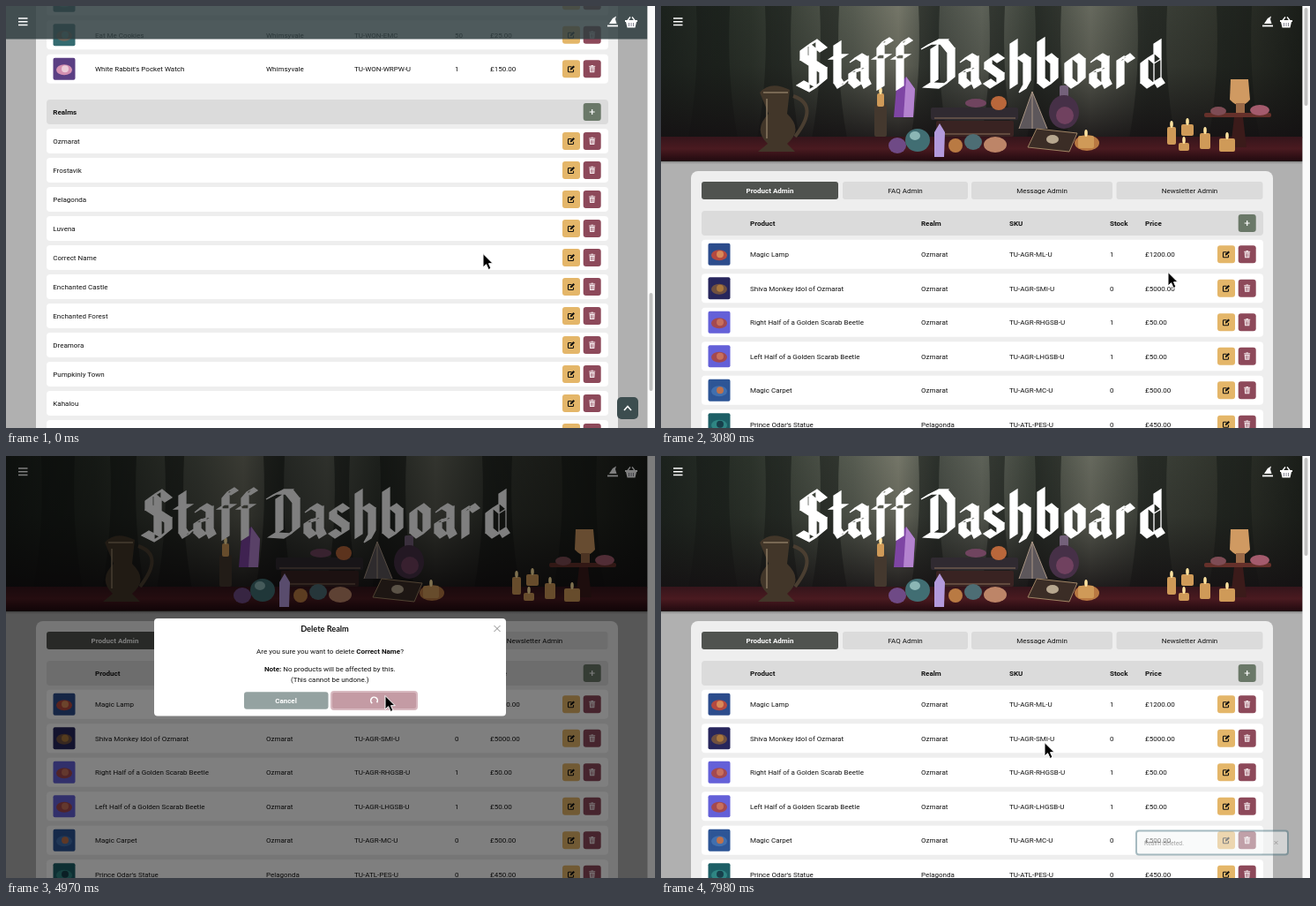
Recreate the animation shown at these times as an HTML page. Size 736 by 478 pixels, loop 8 s.

```html
<!DOCTYPE html>
<html lang="en">
<head>
<meta charset="utf-8">
<title>Staff Dashboard</title>
<style>
html, body { margin: 0; width: 736px; height: 478px; overflow: hidden; background: #b0b0b0; }
svg { display: block; }
text { font: 8px Roboto, sans-serif; fill: #111; white-space: pre; }
.b { font-weight: 700; }
.m { text-anchor: middle; }
.w { fill: #fff; }
.url { font: 12px "Open Sans", sans-serif; fill: #4b505a; }
.title { font: 700 9.2px Lato, sans-serif; }
.toast { font-size: 6.8px; fill: #444; }
</style>
</head>
<body>
<svg id="stage" width="736" height="478" viewBox="0 0 736 478"></svg>
<script>
const LOOP = 8000;
const CLICK = 1150, LOAD = 2950, OPEN = 3160, CONFIRM = 4803, DONE = 7600, TOAST = 7850;

// Markup helpers
const rect = (x, y, w, h, fill, r = 0, more = '') =>
  `<rect x="${x}" y="${y}" width="${w}" height="${h}" rx="${r}" fill="${fill}" ${more}/>`;
const path = (d, fill, more = '') => `<path d="${d}" fill="${fill}" ${more}/>`;
const line = (d, color, w = 1) => path(d, 'none', `stroke="${color}" stroke-width="${w}"`);
const oval = (x, y, rx, ry, fill) => `<ellipse cx="${x}" cy="${y}" rx="${rx}" ry="${ry}" fill="${fill}"/>`;
const text = (x, y, s, cls = '') => `<text x="${x}" y="${y + 2.8}" class="${cls}">${s}</text>`;
const at = (x, y, s) => `<g transform="translate(${x} ${y})">${s}</g>`;
const group = (id, s) => `<g id="${id}">${s}</g>`;
const gradient = (id, dir, stops) => `<linearGradient id="${id}" ${dir}>` + stops.map(([o, c, a = 1]) =>
  `<stop offset="${o}" stop-color="${c}" stop-opacity="${a}"/>`).join('') + '</linearGradient>';
const DOWN = 'x2="0" y2="1"';

// Buttons
const editBtn = y => at(641, y, rect(-10, -10, 20, 20, '#e4b669', 3) +
  line('M.5-2.5H-2.7Q-3.5-2.5-3.5-1.7V2.7Q-3.5 3.5-2.7 3.5H1.7Q2.5 3.5 2.5 2.7V.8', '#111', 1.1) +
  path('M-1.2 1.4L-.7-.7 2.5-3.9 4-2.4 .8 .8Z', '#111'));
const trashBtn = y => at(664.7, y, rect(-10, -10, 20, 20, '#8d495a', 3) +
  line('M-3.5-3H3.5M-1.3-3.8H1.3', '#f5eaed') +
  path('M-3-2H3L2.6 4H-2.6Z', '#f5eaed') + line('M-1.3-1V3M0-1V3M1.3-1V3', '#8d495a', .6));
const addBtn = y => at(664.7, y, rect(-10, -10, 20, 20, '#6a7868', 3) + line('M-3 0H3M0-3V3', '#fff', 1.2));
const spinner = (id, x, y) => at(x, y, group(id, line('M2.7 2.7A3.8 3.8 0 1 1 2.7-2.7', '#fff', 1.6)));

// Tables
const COLS = [101, 295, 395, 509, 549];
const cells = (y, row, cls) => row.map((s, i) => text(COLS[i], y, s, cls)).join('');
const bar = y => rect(46, y - 14, 637, 28, '#dbdbdb', 4);
const product = (y, row, [back, front, spot]) => rect(46, y - 16.5, 637, 33, '#fff', 4) +
  rect(53.5, y - 12.5, 25, 25, back, 2) + oval(66, y + 1, 9, 6, front) + oval(67, y, 4, 4, spot) +
  cells(y, row) + editBtn(y) + trashBtn(y);
const realm = (name, i) => {
  const y = 153 + 33 * i;
  return rect(46, y - 14, 637, 28, '#fff', 4) + text(53.3, y, name) + editBtn(y) + trashBtn(y);
};

const REALMS = ['Ozmarat', 'Frostavik', 'Pelagonda', 'Luvena', 'Correct Name', 'Enchanted Castle',
  'Enchanted Forest', 'Dreamora', 'Pumpkinly Town', 'Kahalou', ''];
const SCARAB = ['#6460d8', '#a4494f', '#c8705c'];
const PRODUCTS = [
  [['Magic Lamp', 'Ozmarat', 'TU-AGR-ML-U', 1, '£1200.00'], ['#2c4c8c', '#b5493f', '#d98a58']],
  [['Shiva Monkey Idol of Ozmarat', 'Ozmarat', 'TU-AGR-SMI-U', 0, '£5000.00'], ['#27265c', '#705040', '#a9763c']],
  [['Right Half of a Golden Scarab Beetle', 'Ozmarat', 'TU-AGR-RHGSB-U', 1, '£50.00'], SCARAB],
  [['Left Half of a Golden Scarab Beetle', 'Ozmarat', 'TU-AGR-LHGSB-U', 1, '£50.00'], SCARAB],
  [['Magic Carpet', 'Ozmarat', 'TU-AGR-MC-U', 0, '£500.00'], ['#2d5596', '#416fae', '#bd714c']],
  [['Prince Odar\'s Statue', 'Pelagonda', 'TU-ATL-PES-U', 0, '£450.00'], ['#1d5f66', '#2f8583', '#173f4b']],
];
const SCROLLED = [
  [['', '', '', '', ''], ['#2d5f68', '#4b8a88', '#33505c']],
  [['Eat Me Cookies', 'Whimsyvale', 'TU-WON-EMC', 50, '£25.00'], ['#356b70', '#75665a', '#5d9691']],
  [['White Rabbit\'s Pocket Watch', 'Whimsyvale', 'TU-WON-WRPW-U', 1, '£150.00'], ['#5b3f83', '#d38fb0', '#eacbd8']],
];

// Blackletter drawn with a slanted broad nib; each polyline follows the nib's lower left corner
const NIB = [8, -5];
const BOWL = '2 30 2 52 9 58 17 51 17 30 10 24 2 30';
const GLYPHS = {
  S: [37, '26 17 15 8 4 16 4 26 26 40 26 52 14 62 0 55', '14 10 14 60'],
  t: [21, '5 10 5 52 9 58 14 53', '0 25 12 25'],
  a: [28, '15 27 15 52 18 58', '15 38 1 42 1 52 7 58 15 51', '2 29 8 24 15 28'],
  f: [22, '5 60 5 13 11 6 15 9', '0 25 12 25'],
  D: [42, '11 14 11 53', '0 14 12 8 22 8 30 18 30 50 20 58 3 57'],
  s: [29, '16 29 9 24 2 29 2 36 16 46 16 53 8 58 1 53'],
  h: [31, '2 8 2 58', '2 30 10 24 17 29 17 54 12 63'],
  b: [31, BOWL, '2 6 2 52'],
  o: [29, BOWL],
  r: [29, '4 27 4 58', '4 31 11 24 16 29'],
  d: [30, BOWL, '17 8 17 51 21 57'],
};
function lettering(word, x, y) {
  let d = '';
  for (const c of word) {
    const [advance, ...strokes] = GLYPHS[c];
    for (const s of strokes) {
      const n = s.split(' ').map(Number);
      for (let i = 0; i + 3 < n.length; i += 2) {
        const [ax, ay, bx, by] = [n[i] + x, n[i + 1] + y, n[i + 2] + x, n[i + 3] + y];
        d += `M${ax} ${ay}L${bx} ${by}l${NIB}L${ax + NIB[0]} ${ay + NIB[1]}Z`;
      }
    }
    x += advance;
  }
  return path(d, '#fff', 'stroke="#fff" stroke-width="1.3"');
}

// Hero banner
const trunk = (x, w) => path(`M${x} 0h${w}q-4 80 9 150h${-w - 18}q13-70 9-150Z`, '#171c18', 'opacity=".55"');
const candle = (x, y, w, h) => rect(x - w / 2, y, w, h, '#cf9a58', 2) + oval(x, y - 3, 1.8, 4, '#ffe3a0');
const hero = rect(0, 0, 727.5, 176, 'url(#forest)') +
  [[40, 38], [118, 30], [180, 22], [292, 24], [372, 18], [424, 30], [540, 34], [630, 40]].map(a => trunk(...a)).join('') +
  rect(0, 0, 727.5, 150, 'url(#mist)') + rect(0, 148, 727.5, 27.5, 'url(#cloth)') +
  // jug and candle
  line('M150 102Q180 112 152 148', '#4a3e31', 4) +
  path('M112 98Q124 84 146 95L143 122Q162 140 143 156L152 165H110L121 156Q104 140 122 122Z', '#423629') +
  line('M120 105V150M116 98H144', '#8a7a62', 1.5) +
  rect(242, 112, 14, 36, '#44382e', 2) + candle(249, 99, 8, 15) +
  // crystals and books
  path('M264 126L267 92 278 80 288 94 286 126Z', '#7e45a4') + path('M278 80L275 126 286 126 288 94Z', '#b483cf') +
  rect(306, 115, 99, 14, '#302a31', 2) + rect(312, 130, 88, 18, '#392322', 2) + line('M310 127H402M315 145H396', '#8a715a', 1) +
  oval(383, 110, 9, 8, '#b9673b') + oval(357, 110, 12, 5, '#70445f') +
  oval(268, 158, 10, 9, '#6f4a86') + oval(291, 152, 14, 13, '#416e73') + oval(288, 147, 6, 5, '#8bb6b5') +
  path('M310 171L310 143 316 133 322 143 321 171Z', '#b39adc') + oval(334, 158, 8, 8, '#b97a43') +
  oval(354, 154, 10, 9, '#4d6d74') + oval(379, 157, 13, 9, '#bd8568') +
  // pyramid, potion, box and candle
  path('M406 139L421 97 438 139Z', '#5d575b') + line('M406 139L421 97 438 139M421 97V139', '#aa9684', 1) +
  rect(452, 90, 10, 18, '#74617a', 2) + oval(457, 120, 17, 19, '#463047') + oval(458, 124, 10, 10, '#70415f') +
  path('M416 160L426 139 472 144 463 165Z', '#3b2d26', 'stroke="#a08565"') + oval(444, 151, 7, 5, '#b7a78f') +
  oval(483, 155, 14, 9, '#b97942') + candle(482, 147, 18, 14) +
  // stand with goblet
  rect(616, 121, 76, 5, '#65302a', 2) + path('M650 126H660L664 160H646Z', '#3b1b1a') +
  path('M646 83H666L668 106Q657 119 645 106Z', '#d09a62') + rect(652, 110, 10, 11, '#9a6947') +
  oval(679, 118, 11, 6, '#a45b6d') + oval(632, 119, 9, 5, '#7e4c55') +
  [[579, 137, 10, 20], [597, 134, 14, 13], [617, 144, 12, 18], [642, 150, 18, 15], [593, 155, 12, 9]].map(a => candle(...a)).join('') +
  `<g role="img" aria-label="Staff Dashboard">${lettering('Staff', 154, 35)}${lettering('Dashboard', 295, 35)}</g>`;

const TABS = [['Product', 46, 155], ['FAQ', 206, 142], ['Message', 352, 160], ['Newsletter', 516.5, 166]];
const tabs = TABS.map(([name, x, w], i) => rect(x, 199, w, 20, i ? '#dbdbdb' : '#50534f', 3) +
  text(x + w / 2, 209, name + ' Admin', i ? 'm' : 'm b w')).join('');

const dashboard = rect(0, 0, 736, 478, '#b0b0b0') + rect(0, 175, 727.5, 4, 'url(#shade)') + hero +
  rect(34, 187, 660, 320, '#eee', 8) + tabs + bar(246) +
  cells(246, ['Product', 'Realm', 'SKU', 'Stock', 'Price'], 'b') + addBtn(246) +
  PRODUCTS.map((p, i) => product(281.3 + 38.5 * i, ...p)).join('');

const realms = rect(0, 0, 736, 478, '#b0b0b0') + rect(34, 0, 660, 478, '#eee') +
  SCROLLED.map((p, i) => product(-5.7 + 38.5 * i, ...p)).join('') +
  bar(120) + text(53.3, 120, 'Realms', 'b') + addBtn(120) + REALMS.map(realm).join('') +
  group('rowBusy', rect(654, 274.5, 21.5, 21, '#bc8e9b', 4, 'stroke="#dcc3ca" stroke-width="1.6"') + spinner('rowSpin', 665, 285)) +
  rect(0, 0, 727.5, 37.5, '#2f3e40', 0, 'opacity=".85"') +
  rect(693, 443, 24, 25, '#3c4d4f', 5) + line('M701 458L705 453.5 709 458', '#fff', 1.6);

const topIcons = line('M14 14H24.5M14 17.7H24.5M14 21.4H24.5', '#fff', 1.5) +
  path('M684 20L688 14 692 11.5 691 15 692.5 20Z', '#fff') + line('M682 22.5H694', '#fff', 1.8) +
  line('M704.5 17L708 12.5M713.5 17L710 12.5', '#fff', 1.3) +
  path('M702 16H716V18H715L713.5 24.5H704.5L703 18H702Z', '#fff') + line('M706.5 19V23M709 19V23M711.5 19V23', '#667', .8);

const modal = rect(168, 184, 399, 110.5, '#fff', 4) + text(361.5, 195.8, 'Delete Realm', 'm title') +
  line('M553.5 192L560.5 199M560.5 192L553.5 199', '#8a8a8a') +
  text(367.5, 221.5, 'Are you sure you want to delete <tspan class="b">Correct Name</tspan>?', 'm') +
  text(367.3, 241.3, '<tspan class="b">Note:</tspan> No products will be affected by this.', 'm') +
  text(367.3, 253.4, '(This cannot be undone.)', 'm') +
  group('ready', rect(270, 267.3, 95.5, 19.5, '#3f5052', 3) + rect(369.5, 267.3, 96, 19.5, '#914a5b', 3) +
    text(417.3, 277, 'Delete', 'm b w')) +
  group('busy', rect(270, 267.3, 95.5, 19.5, '#94a2a1', 3) +
    rect(369, 267, 97, 20, '#c49ba4', 3, 'stroke="#d8b9c0" stroke-width="2"') + spinner('modalSpin', 417.5, 277)) +
  text(317.5, 277, 'Cancel', 'm b w');

const toast = rect(539, 424.5, 172, 27, '#f4f6f6', 3, 'stroke="#4f7883" stroke-width="2"') +
  text(548, 438, 'Realm deleted.', 'toast') + line('M695.5 436L699.5 440M699.5 436L695.5 440', '#777', .8);

const status = rect(-4, 457.5, 247.5, 24, '#cfdaf3', 3, 'stroke="#a5b2d3"') +
  text(5, 469.3, '...herokuapp.com/staff/.../53/', 'url');

stage.innerHTML = '<defs>' +
  gradient('forest', '', [[0, '#1d241f'], [.14, '#30382f'], [.3, '#62685c'], [.37, '#858777'], [.43, '#50564e'],
    [.5, '#6a6f64'], [.58, '#41483f'], [.67, '#75786b'], [.76, '#444940'], [.88, '#34382f'], [1, '#1b1f1a']]) +
  gradient('mist', DOWN, [[0, '#141412', .15], [.45, '#141412', .3], [1, '#141012', .88]]) +
  gradient('cloth', DOWN, [[0, '#35151b'], [.5, '#4a1a20'], [1, '#210a0f']]) +
  gradient('shade', DOWN, [[0, '#000', .35], [1, '#000', 0]]) + '</defs>' +
  group('realmView', realms) + group('dashView', dashboard) + topIcons +
  rect(727.5, 0, 8.5, 478, '#fafafa') + group('thumb', rect(729.5, 0, 4, 111, '#c1c1c1', 2)) +
  group('dim', rect(0, 0, 736, 478, '#000')) + group('modalBox', modal) +
  group('toastBox', toast) + group('statusBar', status) +
  group('cursor', path('M0 0V15.5L3.6 12.2 6.2 18 9 16.8 6.5 11.2H11.2Z', '#000', 'stroke="#fff" stroke-width="1"'));

// Motion
const clamp = v => Math.max(0, Math.min(1, v));
const $ = id => document.getElementById(id);
const show = (id, on) => $(id).style.display = on ? '' : 'none';
const move = (id, x, y) => $(id).setAttribute('transform', `translate(${x} ${y})`);
const fade = (id, v) => { $(id).setAttribute('opacity', v); show(id, v > 0); };
const spin = (id, ms) => $(id).setAttribute('transform', `rotate(${ms * 360 / 750})`);

// Each leg: start, end, target
const START = [541, 280.5];
const LEGS = [[150, 950, 672, 286.5], [1500, 2300, 575, 301.5], [3450, 4400, 430, 271.5],
  [5100, 6100, 449, 307.5], [6500, 7300, 435, 324.5]];
function pointer(t) {
  let [x, y] = START;
  for (const [a, b, tx, ty] of LEGS) {
    const u = clamp((t - a) / (b - a)), e = u * u * (3 - 2 * u);
    x += (tx - x) * e;
    y += (ty - y) * e;
  }
  return [x, y];
}

function draw(t) {
  const open = t >= OPEN && t < DONE;
  const u = clamp((t - OPEN) / 300);
  show('realmView', t < LOAD);
  show('dashView', t >= LOAD);
  show('rowBusy', t >= CLICK);
  spin('rowSpin', t - CLICK);
  show('statusBar', t >= 850 && t < 1900);
  show('thumb', !open);
  move('thumb', 0, t < LOAD ? 325 : 2);
  fade('dim', open ? .5 * clamp((t - OPEN) / 150) : 0);
  fade('modalBox', open ? clamp((t - OPEN) / 150) : 0);
  move('modalBox', 0, -27 * (1 - u) ** 2);
  show('ready', t < CONFIRM);
  show('busy', t >= CONFIRM);
  spin('modalSpin', t - CONFIRM);
  fade('toastBox', clamp((t - TOAST) / 260));
  move('cursor', ...pointer(t));
}

const began = performance.now();
function tick() {
  draw((performance.now() - began) % LOOP);
  requestAnimationFrame(tick);
}
tick();
</script>
</body>
</html>
```
